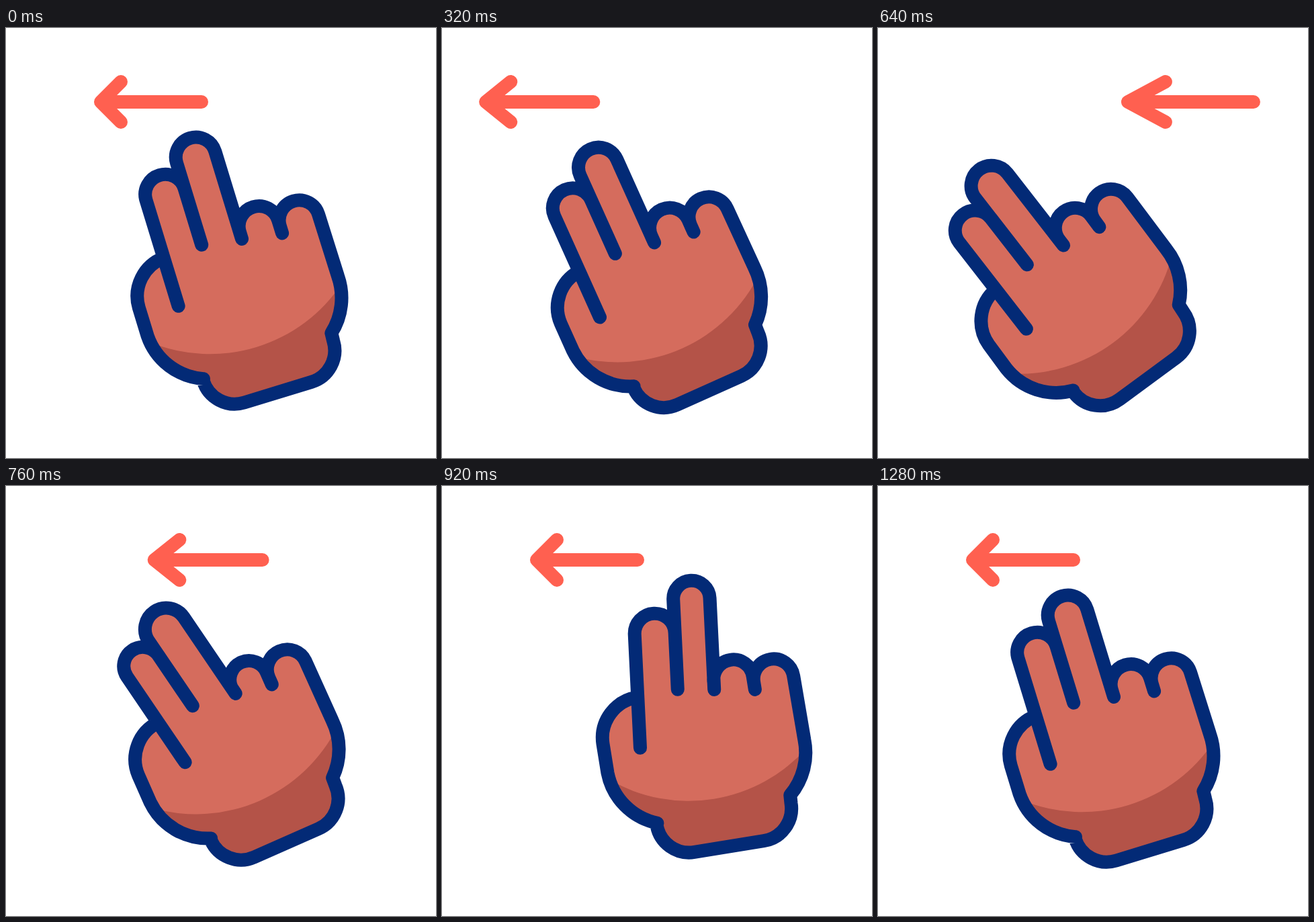
An HTML page that plays this animation: 640 by 640 pixels, repeating every 1480 ms.

```html
<!DOCTYPE html>
<html lang="en">
<head>
<meta charset="utf-8">
<title>Two-finger swipe left</title>
<style>
  html, body { margin: 0; width: 100%; height: 100%; overflow: hidden; background: #fff; }
  svg { display: block; width: 100vw; height: 100vh; }
  .line { fill: none; stroke-width: 20; stroke-linecap: round; stroke-linejoin: round; }
</style>
</head>
<body>
<svg viewBox="0 0 640 640">
  <defs>
    <clipPath id="inside"><path class="outline"/></clipPath>
  </defs>
  <g class="line" stroke="#ff6050">
    <path class="arrow"/>
    <path class="arrow"/>
  </g>
  <g id="hand">
    <path class="outline" fill="#d56c5d"/>
    <path clip-path="url(#inside)" fill="#b45348"
      d="M-161 -78.5A235.5 235.5 0 0 0 139 -78.5V80H-161Z"/>
    <path class="outline line" stroke="#032a76"/>
  </g>
</svg>
<script>
const LOOP = 1480, STEP = 40;
const GAP = 770;      // distance between the leaving and the arriving arrow
const STRETCH = 48;   // how much an arrow lengthens at full speed

const all = s => document.querySelectorAll(s);
const hand = document.getElementById('hand');
const outlines = all('.outline');
const arrows = all('.arrow');

const progress = (t, start, end) => Math.min(1, Math.max(0, (t - start) / (end - start)));
const ease = u => (1 - Math.cos(Math.PI * u)) / 2;

// Eased moves one after another, each [start, end, new value]
const follow = (t, value, ...moves) => moves.reduce(
  (v, [start, end, to]) => v + (to - v) * ease(progress(t, start, end)), value);

// Wind up, swipe, swing back past the rest pose, settle
const pose = t => ({
  x: follow(t, 390.3, [40, 160, 387.3], [160, 500, 366.5], [560, 920, 419.5], [920, 1260, 390.3]),
  y: follow(t, 495.3, [40, 160, 505.8], [160, 500, 481], [560, 860, 488.2], [920, 1260, 495.3]),
  tilt: follow(t, 17, [40, 160, 3.6], [160, 438, 37], [610, 920, 9.2], [920, 1260, 17]),
  bend: follow(t, 0, [40, 160, 1.2], [160, 320, 0], [600, 760, -10.4], [760, 920, 6.4], [920, 1260, 0]),
  squeeze: follow(t, 0, [40, 160, 0.5], [160, 320, 0], [600, 760, 1], [760, 920, 0])
});

const arc = (r, x, y) => `A${r} ${r} 0 0 1 ${x} ${y}`;

// Rounded fingertip between two leaning lines
function fingertip(left, right, y, angle) {
  const cos = Math.cos(angle), sin = Math.sin(angle);
  const top = y - 30 + (right(y) - left(y)) / 2 * cos;
  const r = (right(top) - left(top)) / 2 * cos;
  const x = (left(top) + right(top)) / 2;
  return `L${x - r * cos} ${top - r * sin}` + arc(r, x + r * cos, top + r * sin);
}

// Hand outline, drawn upright around the wrist
function handPath({ bend, squeeze }) {
  const angle = bend * Math.PI / 180;
  const back = Math.max(0, -bend), ahead = Math.max(0, bend);
  const line = (x, y) => Object.assign(at => x - (at - y) * Math.tan(angle), { foot: `${x} ${y}` });
  const l0 = line(-104 + 14.5 * squeeze - 0.5 * ahead, -117 - 0.45 * back);
  const l1 = line(-44.3 + 0.95 * ahead - 0.1 * back, -194);
  const l2 = line(15.5 + 5 * squeeze, -185);
  const ring = l2(-195.6), drop = 0.5 * back;
  return `M${l0.foot}` + fingertip(l0, l1, -281.5 + drop, angle)
    + `L${l1.foot}` + fingertip(l1, l2, -321 + drop, angle)
    + `L${l2.foot}L${ring} -195.6` + arc((75.4 - ring) / 2, 75.4, -195.6)
    + 'V-175.5V-186.5' + arc(29.9, 135.2, -186.5)
    + 'L136 -90' + arc(98, 102, -12)
    + 'L101.3 0' + arc(49, 52.3, 49) + 'H-52.3' + arc(49, -101.3, 0)
    + 'L-100 -2.5' + arc(95, -161, -88)
    + 'V-132' + arc(61, l0(-192), -192) + 'Z';
}

function arrowPath(tip, lag) {
  const barb = tip + 30 + 0.7 * lag;
  return `M${barb} 80L${tip} 110L${barb} 140M${tip} 110H${tip + 150 + lag}`;
}

function draw(t) {
  const p = pose(t), d = handPath(p);
  outlines.forEach(o => o.setAttribute('d', d));
  hand.setAttribute('transform', `translate(${p.x} ${p.y}) rotate(${-p.tilt})`);

  const u = progress(t, 168, 916);
  const lag = STRETCH * Math.sin(Math.PI * u) ** 3;
  arrows.forEach((a, i) => a.setAttribute('d', arrowPath(141 + GAP * (i - ease(u)), lag)));
}

function tick() {
  const t = performance.now() % LOOP;
  draw(Math.floor(t / STEP) * STEP);
  requestAnimationFrame(tick);
}
tick();
</script>
</body>
</html>
```
